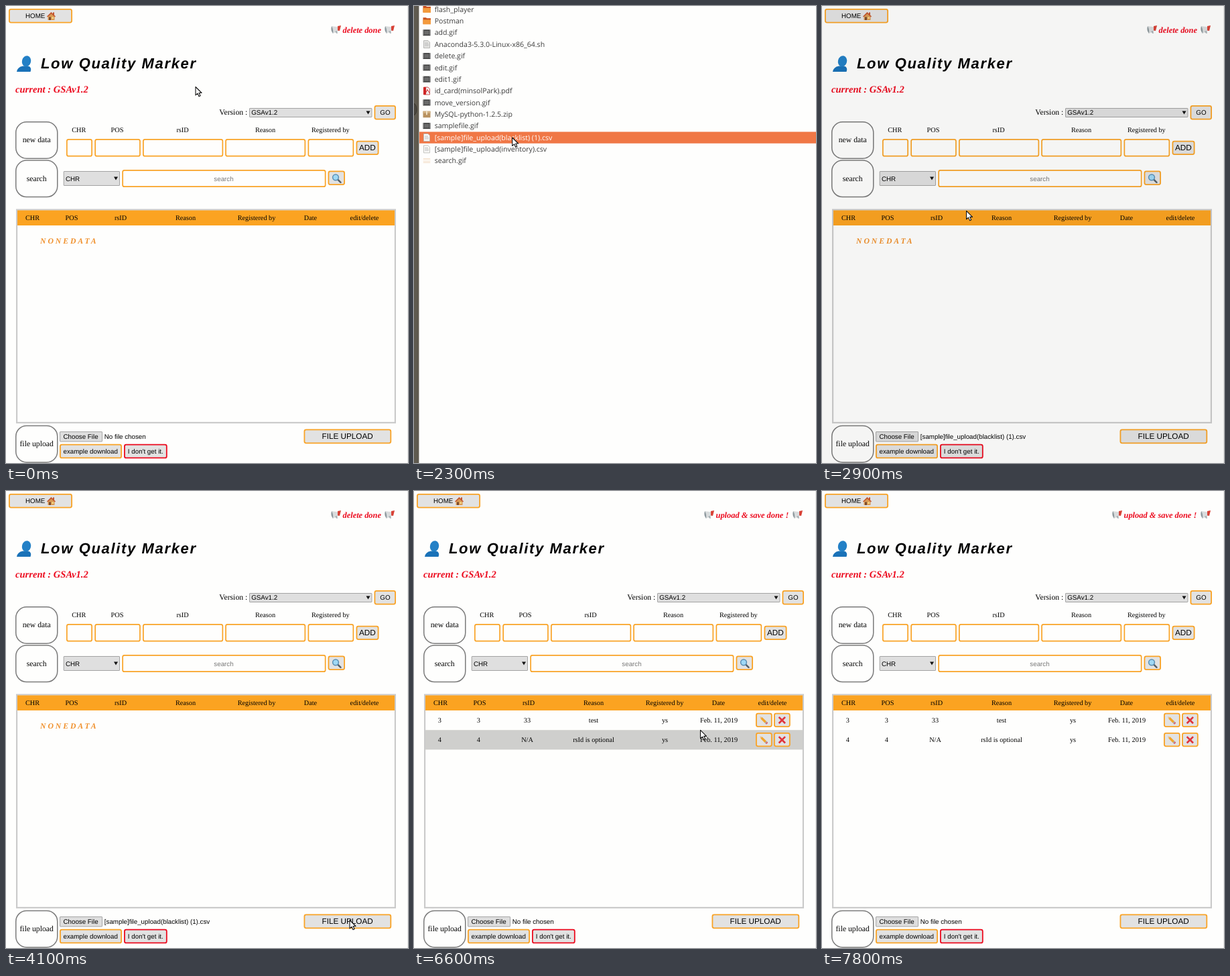
Recreate the animation shown at these times as an HTML page. Size 600x681 px, loop 9300 ms.

```html
<!DOCTYPE html>
<html lang="en">
<head>
<meta charset="utf-8">
<title>Low Quality Marker</title>
<style>
html, body { margin: 0; width: 100%; height: 100%; overflow: hidden; background: #fefefd; }
svg { display: block; width: 100vw; height: 100vh; }
text { text-rendering: geometricPrecision; white-space: pre; }
.sans { font-family: "Liberation Sans", Arial, sans-serif; }
.serif { font-family: "Liberation Serif", "Times New Roman", serif; }
.list { font-family: "Open Sans", "Noto Sans", sans-serif; }
.bi { font-weight: bold; font-style: italic; }
</style>
</head>
<body>
<svg id="stage" viewBox="0 0 600 681" preserveAspectRatio="none"></svg>
<script>
const LOOP = 9300, STEP = 100;
const ORANGE = '#f9a326', RED = '#ec0a1e', PAPER = '#fefefd', FACE = '#e2e2e2';
const SMALL = 9.78, MID = 10.27, BASE = 11.73;

const rect = (x, y, x2, y2, fill, extra = '') =>
  `<rect x="${x}" y="${y}" width="${x2 - x}" height="${y2 - y}" fill="${fill}" ${extra}/>`;
const label = (s, x, y, size, cls = 'serif', extra = '') =>
  `<text x="${x}" y="${y}" font-size="${size}" class="${cls}" ${extra}>${s}</text>`;
const mid = (s, x, y, size, cls, extra = '') =>
  label(s, x, y, size, cls, 'text-anchor="middle" ' + extra);
const shape = (d, fill, extra = '') => `<path d="${d}" fill="${fill}" ${extra}/>`;
const at = (x, y, body, extra = '') => `<g transform="translate(${x} ${y})" ${extra}>${body}</g>`;
const group = (id, body, extra = '') => `<g id="${id}" ${extra}>${body}</g>`;

// Outlined boxes: the stroke lies inside the given edges.
const framed = (x, y, x2, y2, fill, line, w, r, extra = '') =>
  rect(x + w / 2, y + w / 2, x2 - w / 2, y2 - w / 2, fill,
    `stroke="${line}" stroke-width="${w}" rx="${r}" ${extra}`);
const button = (x, y, x2, y2, line = ORANGE, extra = '') => framed(x, y, x2, y2, FACE, line, 1.8, 2.5, extra);
const field = (x, y, x2, y2) => framed(x, y, x2, y2, PAPER, ORANGE, 1.7, 2.5);
const badge = (y, s) => framed(14, y, 77.5, y + 56, PAPER, '#7b7b7b', 1.5, 16) + mid(s, 45.7, y + 31.3, BASE, 'serif');
const select = (x, y, x2, y2, s, base) =>
  framed(x, y, x2, y2, '#dfdfdf', '#a3a3a3', 1, 0.5) + label(s, x + 3.2, base, SMALL, 'sans') +
  shape(`M${x2 - 9} ${base - 6}h6l-3 5z`, '#111');

const house = shape('M1.5 7v5.5h10V7L6.5 2z', '#d99a54') + shape('M0 7L6.5 .5L9 3V1h2v4l2 2l-1 1L6.5 3L1 8z', '#c2552e') +
  shape('M3 8h3v4.5H3z', '#7b4a2b') + shape('M7.5 8h2.5v2.5H7.5z', '#f7dc8c');
const horn = shape('M1 2L12 3.5L13 8L3 13Q0 8 1 2z', '#d9dcdd') + shape('M1 2Q4 7 3 13Q-1 8 1 2z', '#8d989d') +
  shape('M10 2l5-1l-2 8l-3-.5z', '#d84237') + shape('M6 10l3-1.2l1 4H8z', '#a8b1b5');
const person = shape('M0 24Q1 17 9 15.5H17Q23 17 20.5 24z', '#1a72b8') +
  '<ellipse cx="14.5" cy="8.3" rx="6.6" ry="8.2" transform="rotate(14 14.5 8.3)" fill="#2380c6"/>';
const lens = '<path d="M8.5 8.5L13 13" stroke="#555f66" stroke-width="2.4" stroke-linecap="round"/>' +
  '<circle cx="5.5" cy="5.5" r="4.4" fill="#9fd8f5" stroke="#5a8fb5" stroke-width="1.5"/>';
const pencil = shape('M0 1L3.6 1.9L1.3 4.3z', '#e9c08a') + shape('M3.6 1.9L10 8L7.6 10.5L1.3 4.3z', '#f3a52c') +
  shape('M10 8l1.1 1l-2.4 2.5l-1.1-1z', '#9aa5aa') + shape('M11.1 9l1 1q-.5 2-2.4 2.5l-1-1z', '#e05c60');
const cross = '<path d="M1.3 1.3L10.7 10.7M10.7 1.3L1.3 10.7" stroke="#e0353c" stroke-width="2.7"/>';

const COLS = [39.5, 98, 171, 268, 374, 454.5, 535];
const HEADS = ['CHR', 'POS', 'rsID', 'Reason', 'Registered by', 'Date', 'edit/delete'];
const CELLS = [38.3, 96.3, 169, 268, 374.5, 455];
const ROWS = [
  ['3', '3', '33', 'test', 'ys', 'Feb. 11, 2019'],
  ['4', '4', 'N/A', 'rsId is optional', 'ys', 'Feb. 11, 2019']
];
const ROW_TOP = 327, ROW_H = 29.2;

const tableRow = (cells, i) => {
  const y = ROW_TOP + i * ROW_H;
  return rect(17, y, 580, y + ROW_H, '#cfcfcd', `id="hover${i}"`) +
    cells.map((s, c) => mid(s, CELLS[c], y + 17.5, MID, 'serif')).join('') +
    button(510, y + 3.7, 534.7, y + 25) + at(516, y + 8.2, pencil) +
    button(537, y + 3.7, 561.7, y + 25) + at(543.3, y + 8.6, cross);
};

const notice = (s, x) => at(x, 28, horn) + label(s, x + 17.5, 39.6, 12.4, 'serif bi', `fill="${RED}"`) + at(565, 28, horn);

const inputs = [[90, 129, 'CHR', 108.7], [132.3, 200.8, 'POS', 166], [204, 324.2, 'rsID', 263.5],
  [327.2, 447.2, 'Reason', 387], [450.5, 519.2, 'Registered by', 484.3]];

function page() {
  return rect(0, 0, 600, 681, PAPER) + rect(599, 0, 600, 681, '#ebebea') +
    button(4, 4, 99, 25.5) + label('HOME', 29, 18.3, SMALL, 'sans') + at(61, 8.5, house) +
    group('before', notice('delete done', 485)) + group('after', notice('upload &amp; save done !', 433)) +
    at(16, 74, person) +
    label('Low Quality Marker', 52, 93.3, 22, 'sans bi', 'letter-spacing="1.65"') +
    label('current : GSAv1.2', 14, 129, 14.6, 'serif bi', `fill="${RED}"`) +
    label('Version :', 318.3, 162.2, BASE) + select(363, 152, 546.5, 166, 'GSAv1.2', 162.4) +
    button(549.5, 148, 582, 169.5) + mid('GO', 565.9, 162.4, SMALL, 'sans') +
    badge(172, 'new data') + badge(229.3, 'search') + badge(624.7, 'file upload') +
    inputs.map(([x, x2, s, c]) => mid(s, c, 188, MID, 'serif') + field(x, 198, x2, 224.5)).join('') +
    button(522.5, 200.7, 556.5, 222) + mid('ADD', 539.4, 215.2, BASE, 'sans') +
    select(85.7, 246, 170, 268, 'CHR', 260.6) +
    field(173.3, 244, 477.5, 270) + mid('search', 325, 260.6, SMALL, 'sans', 'fill="#777"') +
    button(480.5, 245.5, 506, 267) + at(486.5, 249.8, lens) +
    framed(15, 302.5, 582, 622, PAPER, '#cbcbcb', 2.2, 0) +
    rect(17, 304.5, 580, 327, '#fba321') +
    HEADS.map((s, i) => mid(s, COLS[i], 318.6, MID, 'serif')).join('') +
    group('empty', label('NONEDATA', 51, 353.6, BASE, 'serif bi', 'letter-spacing="2.93" fill="#f0902c"')) +
    group('rows', ROWS.map(tableRow).join('')) +
    framed(80, 634, 144, 649.5, '#dedede', '#a6a6a6', 1, 0.5, 'id="choose"') +
    label('Choose File', 85.5, 645.2, SMALL, 'sans') +
    label('', 146.8, 645.2, SMALL, 'sans', 'id="chosen"') +
    button(80, 652.7, 173, 674.3) + mid('example download', 126.2, 667.4, SMALL, 'sans') +
    button(176, 652.7, 240.7, 674.3, RED) + mid("I don't get it.", 208.3, 667.4, SMALL, 'sans') +
    button(444.5, 630.5, 575.2, 652.2, ORANGE, 'id="upload"') + mid('FILE UPLOAD', 509.6, 645.3, BASE, 'sans');
}

const sheet = (fill, line) => shape('M1.5-5.5H8L10.5-3V5.5H1.5z', fill, `stroke="${line}" stroke-width=".8"`);
const marks = '<path d="M3-2h5M3 0h6M3 2h6" stroke="#aaa" stroke-width=".7"/>';
const ICONS = {
  dir: shape('M.5-5H5L6-4H12V4.5H.5z', '#c9501f') + shape('M.5-2H12V5H.5z', '#f39a3c'),
  gif: rect(0.5, -4.5, 11.5, 4.5, '#3c3c3c') + rect(2.5, -3, 9.5, 3, '#6b6b6b') +
    '<path d="M1.5-4V4M10.5-4V4" stroke="#ddd" stroke-width=".8" stroke-dasharray="1 1"/>',
  sh: sheet('#e4e4e2', '#a8a8a6') + marks,
  pdf: sheet('#f4eeee', '#b33') + rect(1, -5.5, 5, 5.5, '#cf2626') + shape('M4 4L7-2L10 3', 'none', 'stroke="#cf2626"'),
  zip: rect(0.5, -4.5, 11.5, 5, '#b89261') + rect(0.5, -4.5, 11.5, -1.5, '#d2b184') + rect(5, -4.5, 7, 1, '#efe0c4'),
  csv: sheet('#fafaf8', '#b5b5b2') + marks,
  pale: rect(0.5, -4, 11.5, 4, '#fbf4ec') + '<path d="M1-3h10M1 2h10" stroke="#f0d9c0" stroke-width=".8"/>'
};
const PICK = 11, PICK_NAME = '[sample]file_upload(blacklist) (1).csv';
const FILES = [['dir', 'flash_player'], ['dir', 'Postman'], ['gif', 'add.gif'],
  ['sh', 'Anaconda3-5.3.0-Linux-x86_64.sh'], ['gif', 'delete.gif'], ['gif', 'edit.gif'], ['gif', 'edit1.gif'],
  ['pdf', 'id_card(minsolPark).pdf'], ['gif', 'move_version.gif'], ['zip', 'MySQL-python-1.2.5.zip'],
  ['gif', 'samplefile.gif'], ['csv', PICK_NAME], ['csv', '[sample]file_upload(inventory).csv'], ['pale', 'search.gif']];

function dialog() {
  return rect(0, 0, 600, 681, PAPER) + rect(0, 0, 7, 681, '#5f5a4f') + rect(7, 0, 8, 681, '#b9b6b0') +
    '<ellipse cx="-1" cy="154" rx="5" ry="9" fill="#4a463e" stroke="#37342e"/>' +
    rect(8, 187.5, 600, 204.7, '#f07746', 'id="pick"') +
    FILES.map(([icon, name], i) => {
      const y = 5 + 17.36 * i;
      return at(13, y, ICONS[icon]) +
        label(name, 30.7, y + 3.7, 10.55, 'list', `fill="#3c3c3c" ${i === PICK ? 'id="pickName"' : ''}`);
    }).join('');
}

const arrow = shape('M0 0V12.4L2.9 9.8L5 14.3L7.1 13.3L5.1 9H9z', '#fff', 'stroke="#111" stroke-width="1.1" stroke-linejoin="round"');
const stage = document.getElementById('stage');
stage.innerHTML = page() + rect(0, 0, 600, 681, '#000', 'id="dim"') + group('dialog', dialog()) + group('cursor', arrow);
const $ = id => document.getElementById(id);

// Pointer keys: time, x, y
const TRACK = [
  [0, 283, 120.5], [200, 255, 80], [400, 110, 150], [600, 8, 360], [800, 60, 620], [900, 104, 657], [1000, 116, 642.5],
  [1300, 116, 642.5], [1600, 128, 440], [2000, 150, 203.5], [2100, 150, 203.5], [2200, 146.7, 196],
  [2700, 146.7, 196], [3000, 250, 360], [3300, 440, 600], [3500, 500, 666],
  [3700, 466, 655], [3900, 492, 646], [4100, 513, 639.5],
  [5200, 513, 639.5], [5400, 529, 650], [5600, 380, 666], [5800, 120, 640], [5900, 30, 570], [6000, 80, 490],
  [6200, 300, 414], [6600, 427.5, 356.4], [6900, 445, 316], [7200, 470, 366], [7400, 482, 290], [7800, 490, 181]
];

function track(t) {
  const i = TRACK.findIndex(k => k[0] > t);
  if (i < 0) return TRACK[TRACK.length - 1].slice(1);
  const [t0, x0, y0] = TRACK[i - 1], [t1, x1, y1] = TRACK[i];
  const k = (t - t0) / (t1 - t0);
  return [x0 + (x1 - x0) * k, y0 + (y1 - y0) * k];
}

const clamp = v => Math.max(0, Math.min(1, v));
const show = (id, on) => $(id).setAttribute('visibility', on ? 'inherit' : 'hidden');
const within = (t, a, b) => t >= a && t < b;

function draw(ms) {
  const t = Math.floor((ms % LOOP) / STEP) * STEP;
  const [x, y] = track(t);
  const saved = t >= 4900;

  show('before', !saved);
  show('after', saved);
  show('empty', !saved);
  show('rows', saved);
  ROWS.forEach((_, i) => {
    const top = ROW_TOP + i * ROW_H;
    show('hover' + i, saved && within(y, top, top + ROW_H));
  });
  $('chosen').textContent = within(t, 2600, 4900) ? PICK_NAME : 'No file chosen';
  $('choose').setAttribute('fill', t === 1100 ? '#d0d0d0' : '#dedede');
  $('upload').setAttribute('fill', t === 4600 ? '#d0d0d0' : FACE);

  const dim = t < 2700 ? clamp((t - 1200) / 200) : clamp((3000 - t) / 300);
  $('dim').setAttribute('opacity', 0.107 * dim);
  const open = t < 2600 ? clamp((t - 1400) / 300) : t === 2600 ? 0.4 : 0;
  $('dialog').setAttribute('opacity', open);
  const picked = t >= 2300;
  show('pick', picked);
  $('pickName').setAttribute('fill', picked ? '#fff' : '#3c3c3c');

  $('cursor').setAttribute('transform', `translate(${x} ${y})`);
  show('cursor', t < 7800);
}

const start = performance.now();
function tick() {
  draw(performance.now() - start);
  requestAnimationFrame(tick);
}
tick();
</script>
</body>
</html>
```
